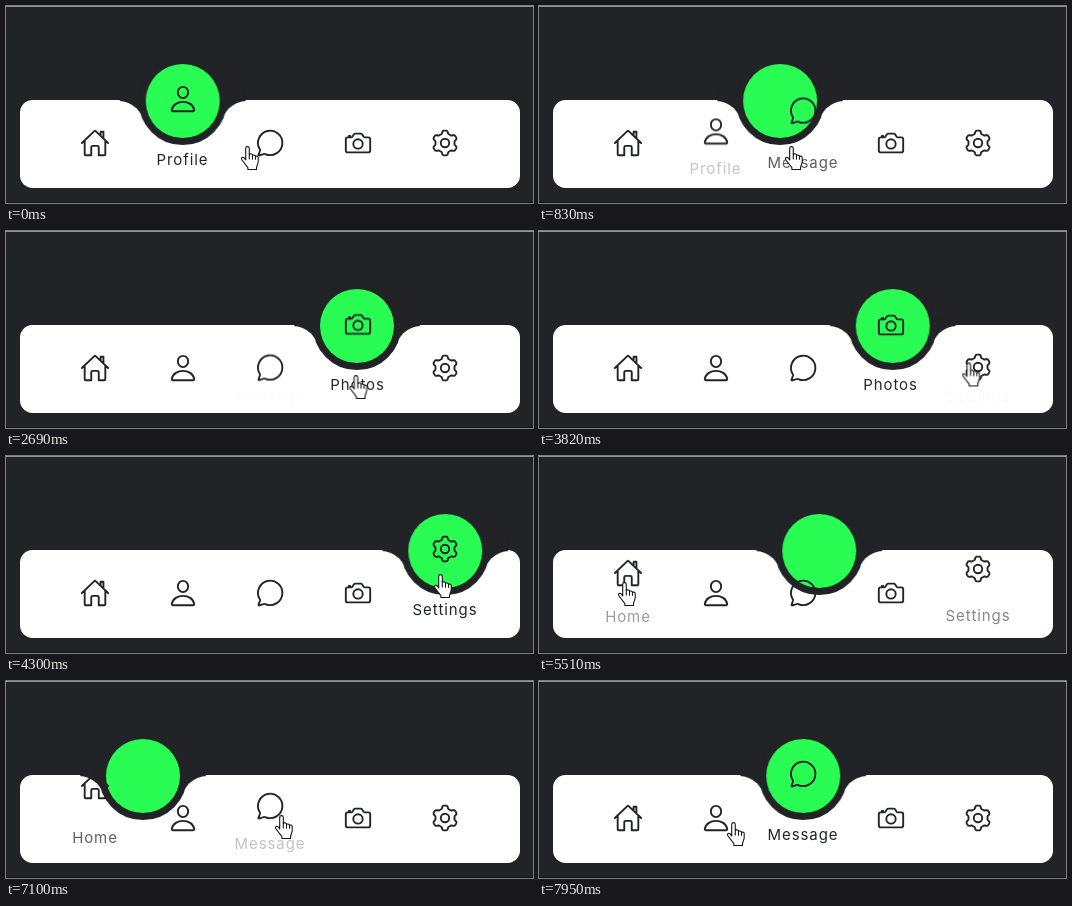
Write an HTML page that moves like this. It is 527 by 197 pixels and loops after 8 s.

```html
<!DOCTYPE html>
<html lang="en">
<head>
<meta charset="utf-8">
<title>Navigation menu</title>
<style>
  :root { --dark: #222327; --green: #29fd53; }
  * { box-sizing: border-box; }
  html, body { margin: 0; width: 100%; height: 100%; overflow: hidden; background: var(--dark); }
  .stage {
    position: relative; width: 527px; height: 197px; overflow: hidden;
    border-top: 1px solid #929396; border-bottom: 1px solid #121316;
  }
  .scene { position: absolute; left: 0; top: -1px; }
  .scene > * { position: absolute; }
  .bar { left: 14px; top: 94px; width: 500px; height: 88px; border-radius: 12.5px; background: #fff; }
  .indicator {
    left: 0; top: 51.25px; width: 87.5px; height: 87.5px;
    border: 7.5px solid var(--dark); border-radius: 50%; background: var(--dark);
  }
  .disc { position: absolute; inset: -.4px; border-radius: 50%; background: var(--green); }
  .indicator::before, .indicator::after {
    content: ""; position: absolute; top: 50%; width: 25px; height: 25px;
  }
  .indicator::before {
    left: -27.5px; border-top-right-radius: 25px; box-shadow: 1.25px -12.5px var(--dark);
  }
  .indicator::after {
    right: -27.5px; border-top-left-radius: 25px; box-shadow: -1.25px -12.5px var(--dark);
  }
  .item { top: 0; width: 87.5px; }
  .icon {
    position: absolute; left: 28.75px; top: 121.5px; width: 30px; height: 30px;
    fill: none; stroke: var(--dark); stroke-width: 2; stroke-linecap: round; stroke-linejoin: round;
  }
  .label {
    position: absolute; left: 0; top: 144px; width: 100%; text-align: center;
    font: 400 15px/20px Inter, sans-serif; letter-spacing: .06em; color: var(--dark);
  }
  .cursor {
    left: 0; top: 0; width: 18px; height: 25px; overflow: visible;
    fill: #fff; stroke: #15151c; stroke-width: 1.1; stroke-linejoin: round; stroke-linecap: round;
  }
</style>
</head>
<body>
<div class="stage">
  <div class="scene">
    <div class="bar"></div>
    <div class="indicator"><div class="disc"></div></div>
    <svg class="cursor" viewBox="0 0 18 25">
      <path d="M4.7 14V2.4a1.8 1.8 0 0 1 3.6 0V8q3-.5 3.2 1.2 2.800-.6 3 1 2.700-.4 2.700 1.400v4.600l-1.700 5.300v2H6.900v-1.800L1 14c-1.300-2.300.8-3.600 2.300-2z"/>
      <path fill="none" d="M8.300 8v5M11.500 9.200v4M14.500 10.200v3"/>
    </svg>
  </div>
</div>
<script>
const LOOP = 8000, EASE_MS = 500;
const FIRST = 45.25, PITCH = 87.5;

// Gear outline: a circle whose radius swings between six teeth and valleys.
function gearPath() {
  const points = Array.from({ length: 120 }, (_, i) => {
    const a = i / 120 * 2 * Math.PI;
    const r = 11.7 + 1.6 * Math.tanh(2.2 * Math.cos(6 * a));
    return `${16 + r * Math.sin(a)} ${16 - r * Math.cos(a)}`;
  });
  return `M${points.join('L')}z`;
}

const ITEMS = [
  ['Home', '<path d="M5 13.3V28q0 1 1 1h6v-8.500q0-1.500 1.500-1.500h5q1.500 0 1.500 1.500V29h6q1 0 1-1V13.300M30 16L16.700 3.300q-.7-.6-1.400 0L2 16M25 11.200V4h-3v4.300"/>'],
  ['Profile', '<ellipse cx="16" cy="9" rx="5.5" ry="6"/><path d="M16 19c-5.400 0-11 3-12 8.700q0 1.300 1 1.300h22q1 0 1-1.300C27 22 21.400 19 16 19z"/>'],
  ['Message', '<path d="M5 22.500A13 13 0 1 1 11 27.800q-1.200-.4-2 0l-4.300 1.500q-1.200 0-.9-.9L5.400 24q.2-.7-.4-1.500z"/>'],
  ['Photos', '<path d="M22 9.300l-1.700-2.600Q19.800 6 18.900 6h-5.800q-.9 0-1.400.7L10 9.300Q9.500 10 8.700 10H5q-2 0-2 2v12q0 2 2 2h22q2 0 2-2V12q0-2-2-2h-3.700q-.8 0-1.300-.7zM7.700 9.900V8.500H6.300v1.400"/><circle cx="16" cy="17" r="5"/>'],
  ['Settings', `<path d="${gearPath()}"/><circle cx="16" cy="16" r="4.5"/>`]
];

// [time, selected item]
const CLICKS = [[480, 2], [2222, 3], [3785, 4], [5374, 0], [6998, 2]];
const INITIAL = 1;

// [start, end, x, y]
const CURSOR_START = [235, 140];
const MOVES = [
  [0, 140, 246, 140], [1120, 1650, 335, 143], [1820, 2830, 344, 144], [2950, 3560, 422, 135],
  [3690, 4050, 428, 118], [4300, 5145, 79, 126], [6120, 6950, 269, 134], [7220, 7946, 188, 141]
];

const scene = document.querySelector('.scene');
const cursor = document.querySelector('.cursor');
const animations = [];

// Holds each pose until the next transition { start, end, pose } begins.
function animate(el, pose, transitions, easing) {
  const frames = [{ offset: 0, ...pose }];
  for (const next of transitions) {
    frames.push({ offset: next.start / LOOP, easing, ...pose }, { offset: next.end / LOOP, ...next.pose });
    pose = next.pose;
  }
  frames.push({ offset: 1, ...pose });
  const animation = el.animate(frames, LOOP);
  animation.pause();
  animations.push(animation);
}

function followClicks(el, poseFor) {
  const transitions = CLICKS.map(([start, selected]) =>
    ({ start, end: start + EASE_MS, pose: poseFor(selected) }));
  animate(el, poseFor(INITIAL), transitions, 'ease');
}

const at = (x, y) => ({ transform: `translate(${x}px, ${y}px)` });

ITEMS.forEach(([name, shape], i) => {
  const item = document.createElement('div');
  item.className = 'item';
  item.style.left = `${FIRST + i * PITCH}px`;
  item.innerHTML = `<svg class="icon" viewBox="0 0 32 32">${shape}</svg><span class="label">${name}</span>`;
  scene.insertBefore(item, cursor);
  followClicks(item.querySelector('.icon'), selected => at(0, selected === i ? -44 : 0));
  followClicks(item.querySelector('.label'), selected =>
    selected === i ? { ...at(0, 0), opacity: 1 } : { ...at(0, 12.5), opacity: 0 });
});

followClicks(document.querySelector('.indicator'), selected => at(FIRST + selected * PITCH, 0));
animate(cursor, at(...CURSOR_START),
  MOVES.map(([start, end, x, y]) => ({ start, end, pose: at(x, y) })), 'ease-in-out');

// Low frame rate: slower at first, then a little faster.
function snap(time) {
  const [from, step] = time < 2830 ? [0, 140] : [2830, 121.8];
  return from + Math.floor((time - from) / step) * step;
}

const start = performance.now();
function draw() {
  const time = snap((performance.now() - start) % LOOP);
  for (const animation of animations) animation.currentTime = time;
  requestAnimationFrame(draw);
}
draw();
</script>
</body>
</html>
```
